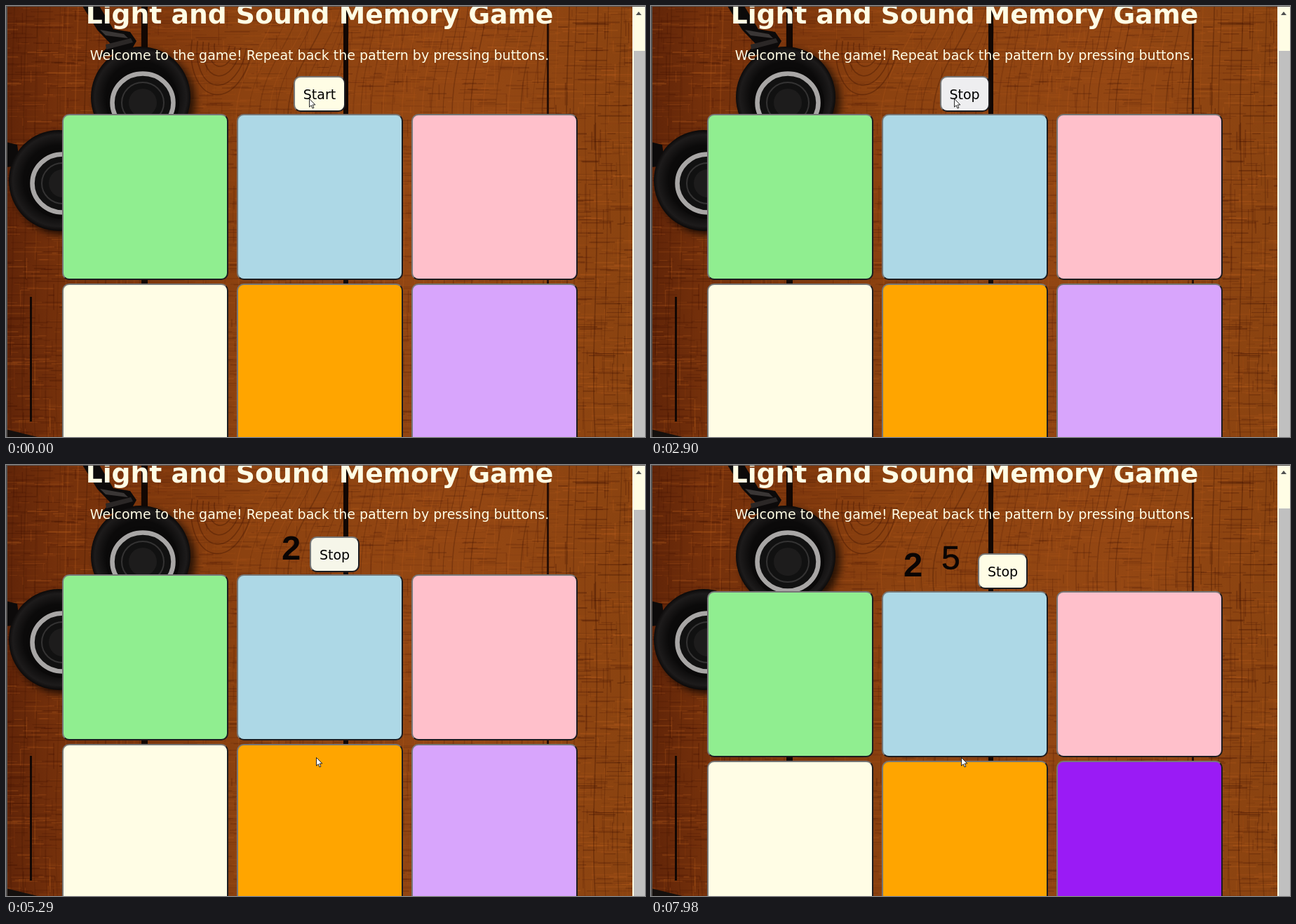
Animation of 911x615 px, one loop 8 s. Source, as an HTML page with a canvas:

```html
<!DOCTYPE html>
<html lang="en">
<head>
<meta charset="utf-8">
<title>Memory Game</title>
<style>
html, body { margin: 0; width: 100%; height: 100%; overflow: hidden; background: #6b2c0b; }
#stage { position: absolute; left: 0; top: 0; width: 911px; height: 615px; overflow: hidden; font: 19px "DejaVu Sans", sans-serif; }
#stage > * { position: absolute; box-sizing: border-box; white-space: nowrap; }
canvas { left: 0; top: 0; }
.line { left: 0; width: 894px; text-align: center; color: #fffde5; line-height: 1; }
#title { top: -6px; font-size: 37.7px; font-weight: bold; }
#welcome { top: 61px; }
.box { border: 2px solid; border-color: #767676 #1c1c20 #1c1c20 #767676; border-radius: 10px; }
.tile { width: 237px; height: 237px; }
#button { height: 51px; line-height: 48px; text-align: center; color: #000; }
.digit { font-family: "Liberation Sans", Arial, sans-serif; line-height: 1; color: #090504; }
#two { font-size: 49px; font-weight: bold; }
#five { font-size: 48px; left: 414px; top: 109px; -webkit-text-stroke: .6px #090504; }
#bar { left: 893px; top: 0; width: 18px; height: 615px; background: #fffde5; }
#thumb { left: 895px; width: 16px; height: 600px; background: #c0c0c0; }
#arrow { left: 898px; top: 8px; border: solid transparent; border-width: 0 4.5px 5px; border-bottom-color: #505050; }
#edge { inset: 0; border: solid #555251; border-width: 1px 0 0 2px; }
</style>
</head>
<body>
<div id="stage">
  <canvas id="desk" width="893" height="615"></canvas>
  <div id="title" class="line">Light and Sound Memory Game</div>
  <div id="welcome" class="line">Welcome to the game! Repeat back the pattern by pressing buttons.</div>
  <div id="two" class="digit">2</div>
  <div id="five" class="digit">5</div>
  <div id="button" class="box"></div>
  <div id="bar"></div>
  <div id="thumb"></div>
  <div id="arrow"></div>
  <div id="edge"></div>
  <svg id="cursor" width="12" height="17" style="left:0;top:0;overflow:visible">
    <path d="M.5 .5V12.2L3.2 9.7L5 14L6.9 13.2L5.1 9H8.9Z" fill="#fff" stroke="#111" stroke-width=".9"/>
  </svg>
</div>
<script>
const $ = id => document.getElementById(id);
const ctx = $('desk').getContext('2d');
const LOOP = 8000;

let seed = 11;
function random() {
  seed = (seed * 16807) % 2147483647;
  return seed / 2147483647;
}
const between = (a, b) => a + (b - a) * random();

function ellipse(x, y, rx, ry, fill, stroke, width) {
  ctx.beginPath();
  ctx.ellipse(x, y, rx, ry, 0, 0, Math.PI * 2);
  if (fill) { ctx.fillStyle = fill; ctx.fill(); }
  if (stroke) { ctx.strokeStyle = stroke; ctx.lineWidth = width; ctx.stroke(); }
}

function polygon(fill, ...points) {
  ctx.beginPath();
  points.forEach(p => ctx.lineTo(...p));
  ctx.fillStyle = fill;
  ctx.fill();
}

function drawWood() {
  const base = ctx.createLinearGradient(0, 0, 893, 0);
  [[0, '#602408'], [.08, '#74300b'], [.2, '#7b350c'], [.38, '#8c4210'], [.75, '#944713'], [1, '#8a4310']]
    .forEach(stop => base.addColorStop(...stop));
  ctx.fillStyle = base;
  ctx.fillRect(0, 0, 893, 615);

  // short fibres across the boards, roughest at the outer edges
  for (let i = 0; i < 5200; i++) {
    const x = between(-20, 893), y = between(0, 615);
    const rough = x < 110 || x > 780 ? 1.4 : .9;
    ctx.fillStyle = random() < .55
      ? `rgba(68,20,0,${rough * between(.08, .28)})`
      : `rgba(190,98,32,${rough * between(.06, .22)})`;
    if (random() < .8) ctx.fillRect(x, y, between(8, 48), between(.7, 2.2));
    else ctx.fillRect(x, y, between(.7, 1.8), between(8, 40));
  }

  // growth lines along each board: left, right, sideways lean
  for (const [left, right, lean] of [[2, 195, 4], [325, 480, 55], [490, 770, 22], [777, 893, 4]]) {
    for (let x = left + 6; x < right; x += between(10, 19)) {
      const dark = random() < .7;
      ctx.beginPath();
      ctx.moveTo(Math.min(x + lean, right), 0);
      ctx.bezierCurveTo(x + lean * .8, 60, x - lean * .3, 100, x, 190);
      ctx.bezierCurveTo(x + 8, 380, x - 8, 480, x, 615);
      ctx.strokeStyle = dark ? `rgba(62,20,2,${between(.12, .35)})` : 'rgba(184,92,30,.25)';
      ctx.lineWidth = between(.8, 2);
      ctx.stroke();
    }
  }
  for (let r = 12; r < 50; r += 9) {
    ctx.beginPath();
    ctx.ellipse(308, 55, r * .9, r * 1.5, .15, 0, Math.PI);
    ctx.strokeStyle = 'rgba(65,20,2,.4)';
    ctx.lineWidth = 1.6;
    ctx.stroke();
  }

  ctx.fillStyle = '#120703';
  ctx.fillRect(193, 0, 9, 615);
  ctx.fillRect(481, 0, 7, 615);
  ctx.fillRect(34, 415, 3, 178);
  ctx.fillStyle = '#280f05';
  ctx.fillRect(771, 25, 3, 590);
  polygon('#15100e', [0, 604], [45, 615], [0, 615]);
}

function drawCup(x, y, ringX, ringY) {
  const shell = ctx.createRadialGradient(x, y, 50, x, y, 72);
  shell.addColorStop(0, '#0b0a0a');
  shell.addColorStop(.7, '#1d1b1b');
  shell.addColorStop(1, '#0a0808');
  ctx.save();
  ctx.shadowColor = 'rgba(0,0,0,.7)';
  ctx.shadowBlur = 12;
  ctx.shadowOffsetX = 7;
  ctx.shadowOffsetY = 6;
  ellipse(x, y, 71, 72, shell);
  ctx.restore();
  ellipse(ringX, ringY, 52, 51, '#0a0909');
  ellipse(ringX, ringY, 43.5, 41.5, '#111', '#a8a6a5', 6.5);
  ellipse(ringX, ringY, 30, 29, null, '#343333', 2);
  ellipse(ringX, ringY, 20, 20, '#1d1c1c');
}

function drawHeadphones() {
  polygon('#0c0a0a', [109, 0], [133, 0], [153, 33], [177, 37], [186, 50], [178, 64], [130, 74], [149, 54], [130, 34]);
  polygon('#3a3635', [134, 34], [168, 40], [174, 46], [142, 42]);
  polygon('#2b2726', [142, 55], [178, 46], [181, 52], [143, 62]);
  drawCup(192, 130, 195, 138);
  polygon('#0c0a0a', [0, 194], [16, 198], [20, 228], [0, 230]);
  drawCup(75, 249, 81, 253);
}

const lit = { blue: '#1b55f2', orange: '#d33918', purple: '#9a1bf5' };
const tiles = [
  ['green', '#90ee90'], ['blue', '#add8e6'], ['pink', '#ffc0cb'],
  ['cream', '#fffde5'], ['orange', '#ffa500'], ['purple', '#d8a5fc']
].map(([name, color], i) => {
  const el = document.createElement('div');
  el.className = 'box tile';
  el.style.left = [80, 329, 578][i % 3] + 'px';
  $('stage').insertBefore(el, $('bar'));
  return { name, color, el, top: i < 3 ? 153.5 : 396 };
});

const flashes = [
  ['orange', 2000, 2900], ['blue', 3420, 3790], ['orange', 5540, 5820],
  ['orange', 6760, 7700], ['purple', 7980, 8000]
];
const cursorPath = [
  [0, 432, 132], [3050, 424, 148], [3173, 402, 188], [3297, 383, 217], [3420, 378, 222],
  [4620, 392, 214], [4740, 447, 364], [4890, 442, 393], [5290, 442, 417]
];
// time, page shift, button centre, width, label, colour
const layouts = [
  [0, 0, 447, 74, 'Start', '#fffde5'],
  [810, 0, 447, 74, 'Start', '#f1f1ec'],
  [930, 0, 447, 71, 'Stop', '#eeeef0'],
  [3790, 2, 468.5, 71, 'Stop', '#f6f6e9'],
  [5820, 26, 501.5, 71, 'Stop', '#fffde5']
];
const latest = (list, t) => list.filter(item => item[0] <= t).pop();

function place(el, left, top) {
  el.style.left = left + 'px';
  el.style.top = top + 'px';
}

function render(t) {
  const [, shift, centre, width, label, color] = latest(layouts, t);
  const button = $('button');
  place(button, centre - width / 2, 100 + shift);
  button.style.width = width + 'px';
  button.style.background = color;
  button.textContent = label;

  for (const tile of tiles) {
    const on = flashes.some(([name, from, to]) => name === tile.name && t >= from && t < to);
    tile.el.style.top = tile.top + shift + 'px';
    tile.el.style.background = on ? lit[tile.name] : tile.color;
  }

  place($('two'), shift > 2 ? 360 : 393, shift + 92);
  $('two').style.visibility = shift ? 'visible' : 'hidden';
  $('five').style.visibility = shift > 2 ? 'visible' : 'hidden';
  $('thumb').style.top = (shift > 2 ? 62 : 63.5) + 'px';

  const [, x, y] = latest(cursorPath, t);
  $('cursor').style.transform = `translate(${x}px, ${y}px)`;
}

drawWood();
drawHeadphones();

const start = performance.now();
function tick() {
  render((performance.now() - start) % LOOP);
  requestAnimationFrame(tick);
}
render(0);
requestAnimationFrame(tick);
</script>
</body>
</html>
```
